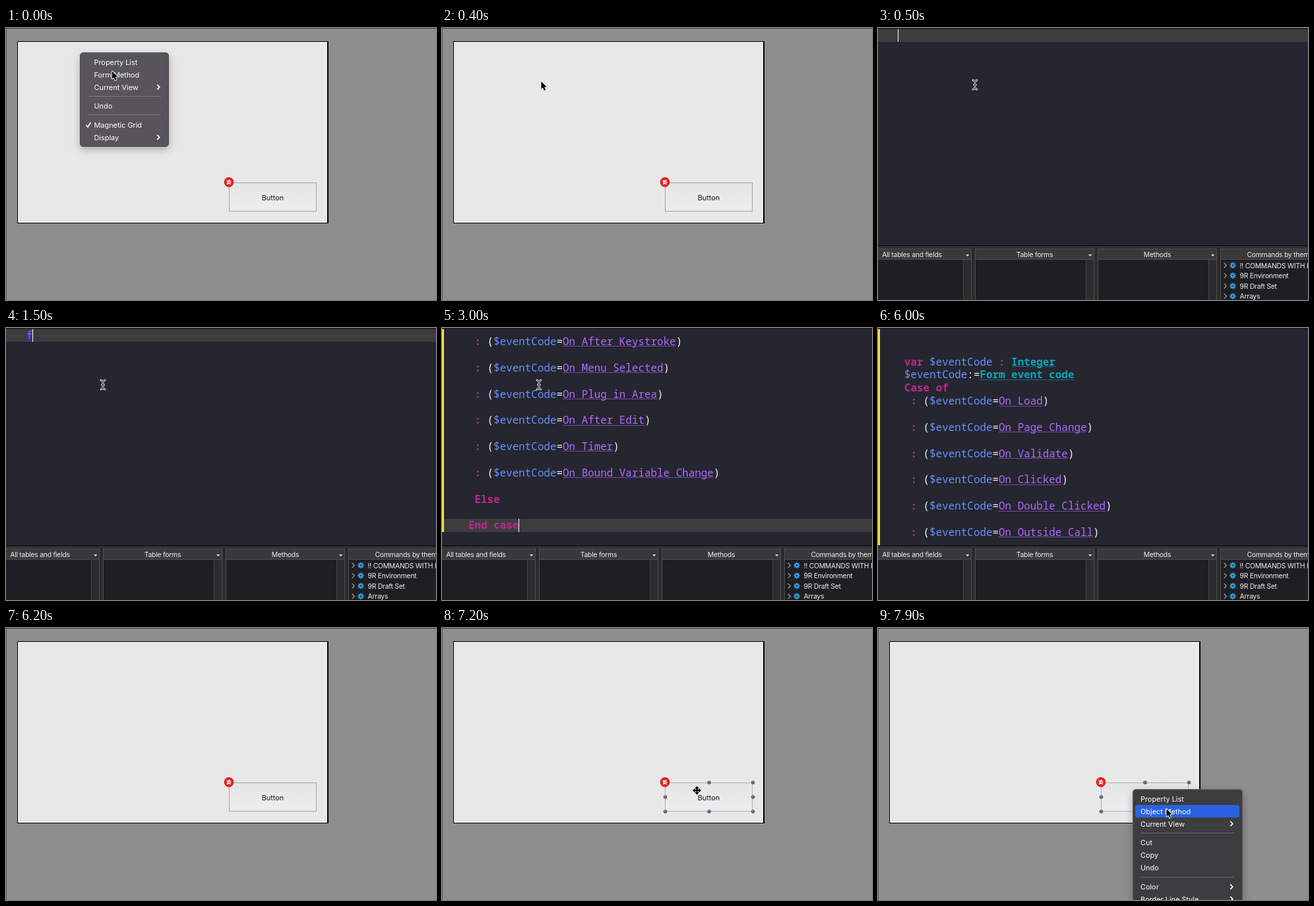
An HTML page with a canvas that plays this animation: 652x412 px, repeating every 8 s.

```html
<!DOCTYPE html>
<html lang="en">
<head>
<meta charset="utf-8">
<title>Event code macro</title>
<style>
html, body { margin: 0; width: 100%; height: 100%; overflow: hidden; background: #8e8e8e; }
canvas { display: block; }
</style>
</head>
<body>
<canvas id="stage" width="652" height="412"></canvas>
<script>
const LOOP = 8000, STEP = 100;
const UI = "Inter, 'Open Sans', sans-serif";
const MONO = "'Noto Sans Mono', 'DejaVu Sans Mono', monospace";
const ADV = 9.535, ROW = 19.88, ROW0 = 11.2, LEFT = 40;
const C = {
  key: '#c2268f', vari: '#6690ff', cons: '#b069ff', type: '#0aa5bd', plain: '#f0f0f2'
};
const g = document.getElementById('stage').getContext('2d');

const clamp = v => Math.max(0, Math.min(1, v));
const span = (t, a, b) => clamp((t - a) / (b - a));
const ease = p => p * p * (3 - 2 * p);
const mix = (a, b, p) => a + (b - a) * p;

function box(x, y, w, h, color) {
  g.fillStyle = color;
  g.fillRect(x, y, w, h);
}

function round(x, y, w, h, r, color) {
  g.fillStyle = color;
  g.beginPath();
  g.roundRect(x, y, w, h, r);
  g.fill();
}

function disc(x, y, r, color) {
  g.fillStyle = color;
  g.beginPath();
  g.arc(x, y, r, 0, Math.PI * 2);
  g.fill();
}

function poly(points, close) {
  g.beginPath();
  points.forEach(([x, y]) => g.lineTo(x, y));
  if (close) g.closePath();
}

function line(points, color, width) {
  poly(points);
  g.strokeStyle = color;
  g.lineWidth = width;
  g.stroke();
}

// y is the middle of the capital letters
function label(str, x, y, color = '#fff', align = 'left', size = 10.9, track = 0) {
  g.font = `${size}px ${UI}`;
  g.letterSpacing = `${track}px`;
  g.textAlign = align;
  g.fillStyle = color;
  g.fillText(str, x, y + 4);
  g.letterSpacing = '0px';
}

const panelLabel = (str, x, y, align) => label(str, x, y, '#eee', align, 10.4, -0.25);

function chevron(x, y, color, s = 3.6, width = 1.7) {
  line([[x - s / 2, y - s], [x + s / 2, y], [x - s / 2, y + s]], color, width);
}

// ---- pointers ----
function arrow(x, y) {
  g.save();
  g.translate(x, y);
  poly([[0, 0], [0, 11.6], [2.6, 9.2], [4.5, 13.8], [6.6, 12.9], [4.7, 8.5], [8.2, 8.2]], true);
  g.lineJoin = 'round';
  g.strokeStyle = '#f4f4f4';
  g.lineWidth = 1.8;
  g.stroke();
  g.fillStyle = '#000';
  g.fill();
  g.restore();
}

function beam(x, y) {
  g.save();
  g.translate(x, y);
  for (const [color, w] of [['#f0f0f0', 2.7], ['#15151a', 1]]) {
    g.lineCap = 'round';
    for (const s of [-1, 1]) line([[-3, 7 * s], [0, 5.6 * s], [3, 7 * s]], color, w);
    line([[0, -5.6], [0, 5.6]], color, w);
    line([[-1.5, 0], [1.5, 0]], color, w);
  }
  g.restore();
}

function moveCross(x, y) {
  g.save();
  g.translate(x, y);
  for (const [color, w] of [['#f4f4f4', 2], ['#000', 0.3]]) {
    for (let i = 0; i < 4; i++) {
      g.rotate(Math.PI / 2);
      poly([[0, -1], [3, -1], [3, -3], [6.4, 0], [3, 3], [3, 1], [0, 1]], true);
      g.strokeStyle = color;
      g.lineWidth = w;
      g.stroke();
      if (color === '#000') { g.fillStyle = color; g.fill(); }
    }
  }
  g.restore();
}

// ---- form editor ----
function badge(x, y) {
  disc(x, y, 7.4, '#e3221f');
  poly([[-4, -3], [-1, -2.5], [0.5, -3.5], [3, -3], [1.6, -0.8], [4.4, 0],
        [1.8, 1], [3, 3.4], [0.2, 2.8], [-3.6, 3.6], [-2, 0]].map(([a, b]) => [x + a, y + b]), true);
  g.fillStyle = '#fff';
  g.fill();
  box(x - 0.4, y - 1, 1.6, 2, '#e3221f');
}

function form(selected) {
  box(0, 0, 652, 412, '#8e8e8e');
  box(0, 0, 1, 412, '#555');
  box(0, 0, 652, 1, '#3e3e3e');
  box(17, 20, 472, 276, '#000');
  box(18, 21, 469, 274, '#e8e8e8');

  const fill = g.createLinearGradient(0, 235, 0, 278);
  fill.addColorStop(0, '#e5e5e5');
  fill.addColorStop(1, '#ededef');
  box(338, 234, 133, 44, fill);
  g.strokeStyle = selected ? '#8c8f94' : '#a2a2a2';
  g.lineWidth = 1;
  if (selected) g.setLineDash([1.5, 0.8]);
  g.strokeRect(338.5, 234.5, 132, 43);
  g.setLineDash([]);
  label('Button', 404.5, 256.5, '#1a1a1a', 'center');

  if (selected) {
    for (const x of [338.5, 405, 471.5]) {
      for (const y of [234, 256, 278]) {
        if (x === 405 && y === 256) continue;
        disc(x, y, 2.8, '#566070');
        disc(x - 0.6, y - 0.7, 1, '#8a94a2');
      }
    }
  }
  badge(338, 233.5);
}

function menuPanel(x, y, w, h, color, rim) {
  g.save();
  g.shadowColor = 'rgba(0,0,0,.28)';
  g.shadowBlur = 12;
  g.shadowOffsetY = 4;
  round(x, y, w, h, 5.5, color);
  g.restore();
  g.strokeStyle = rim;
  g.lineWidth = 1;
  g.beginPath();
  g.roundRect(x + 0.5, y + 0.5, w - 1, h - 1, 5);
  g.stroke();
}

// an item without text is a separator
function menuItems(items, x, right) {
  for (const [str, y, sub] of items) {
    label(str, x, y);
    if (sub) chevron(right - 4, y, '#fff');
  }
}

function formMenu(alpha) {
  g.save();
  g.globalAlpha = alpha;
  menuPanel(112, 37, 135, 143, '#57545b', '#4b494f');
  for (const y of [103, 131]) box(125, y, 110, 1, '#7c7980');
  menuItems([['Property List', 51.5], ['Form Method', 70.5], ['Current View', 89.5, 1], ['Undo', 118],
    ['Magnetic Grid', 146.5], ['Display', 165.5, 1]], 133.5, 235);
  line([[121.5, 147], [124, 150], [128.5, 143]], '#fff', 1.7);
  g.restore();
}

function objectMenu(tipY) {
  menuPanel(386, 244, 167, 200, '#3d3d3f', '#616163');
  const row = Math.floor((tipY - 249) / 19);
  if (row >= 0) round(390, 249 + row * 19, 158, 19, 3.5, '#2a62e2');
  for (const y of [310, 377]) box(398, y, 142, 1, '#68686a');
  menuItems([['Property List', 258.5], ['Object Method', 277.5], ['Current View', 296.5, 1],
    ['Cut', 325], ['Copy', 344], ['Undo', 363], ['Color', 392, 1],
    ['Border Line Style', 410.5, 1]], 398, 540);
}

// ---- code editor ----
const events = ['Load', 'Page Change', 'Validate', 'Clicked', 'Double Clicked', 'Outside Call',
  'Close Box', 'Activate', 'Deactivate', 'Resize', 'Unload',
  'After Keystroke', 'Menu Selected', 'Plug in Area', 'After Edit', 'Timer', 'Bound Variable Change'];

// each line: [column, [text, color, bold, underline], ...]
const code = [];
code[2] = [0, ['var ', C.key, 1], ['$eventCode ', C.vari], [': ', C.key, 1], ['Integer', C.type, 1, 1]];
code[3] = [0, ['$eventCode', C.vari], [':=', C.plain], ['Form event code', C.type, 1, 1]];
code[4] = [0, ['Case of', C.key, 1]];
events.forEach((name, i) => {
  code[5 + 2 * i] = [1, [': ', C.key, 1], ['(', C.plain], ['$eventCode', C.vari], ['=', C.plain],
    ['On ' + name, C.cons, 0, 1], [')', C.plain]];
});
const last = 7 + 2 * events.length;
code[last - 2] = [1, ['Else', C.key, 1]];
code[last] = [0, ['End case', C.key, 1]];
const maxScroll = ROW0 + ROW * last - 298.7;

function mono(str, x, y, color, bold) {
  g.font = `${bold ? 700 : 500} 15.9px ${MONO}`;
  g.textAlign = 'left';
  g.fillStyle = color;
  g.fillText(str, x, y + 5.6);
}

function caretRow(y, caretX) {
  const top = Math.round(y - 10);
  box(0, top, 652, 20, '#3d3d3e');
  box(Math.round(caretX), top, 1, 20, '#fff');
}

function underline(x, y, w, color) {
  g.globalAlpha = 0.55;
  box(x, Math.round(y + 7), w, 1, color);
  g.globalAlpha = 1;
}

function listing(scroll) {
  const endY = ROW0 + ROW * last - scroll;
  caretRow(endY, LEFT + 8 * ADV);
  box(0, 1, 3, Math.round(endY + 9), '#f4df48');
  code.forEach((parts, i) => {
    const y = ROW0 + ROW * i - scroll;
    if (y < -14 || y > 345) return;
    let x = LEFT + parts[0] * ADV;
    for (const [str, color, bold, under] of parts.slice(1)) {
      const w = str.length * ADV;
      if (under) underline(x, y, w, color);
      mono(str, x, y, color, bold);
      x += w;
    }
  });
}

function typed(str) {
  const x = LEFT - ADV, w = str.length * ADV;
  caretRow(ROW0, x + w);
  if (!str) return;
  box(x + 0.5, 3, w - 0.5, 17, '#36367a');
  mono(str, x + 0.3, ROW0, '#7470f2');
}

function gear(x, y) {
  for (let i = 0; i < 8; i++) {
    const a = i * Math.PI / 4;
    line([[x, y], [x + 4.8 * Math.cos(a), y + 4.8 * Math.sin(a)]], '#2f9bd6', 1.7);
  }
  disc(x, y, 3.5, '#2f9bd6');
  disc(x, y, 1.2, '#1d2b38');
}

function panels() {
  box(0, 329, 652, 83, '#2b2b2e');
  box(0, 329, 652, 2, '#141417');
  box(0, 331, 652, 1, '#47474a');
  ['All tables and fields', 'Table forms', 'Methods', 'Commands by theme'].forEach((name, i) => {
    const x = -39 + 186 * i;
    box(x, 334, 181, 17, '#39393c');
    g.strokeStyle = '#505053';
    g.lineWidth = 1;
    g.strokeRect(x + 0.5, 334.5, 180, 80);
    box(x + 1, 351, 179, 61, '#1f1e22');
    box(x, 350, 181, 1, '#505053');
    box(x + 168, 351, 12, 61, '#2c2c2f');
    box(x + 168, 351, 1, 61, '#444447');
    panelLabel(name, x + 90.5, 342.5, 'center');
    poly([[x + 172, 343], [x + 177.5, 343], [x + 174.7, 346]], true);
    g.fillStyle = '#ddd';
    g.fill();
  });
  ['!! COMMANDS WITH ISSUES', '9R Environment', '9R Draft Set', 'Arrays'].forEach((name, i) => {
    const y = 359.5 + 15.6 * i;
    chevron(526.5, y, '#a0a0a3', 3.8, 1.2);
    gear(538, y);
    panelLabel(name, 548.5, y, 'left');
  });
}

function editor(t) {
  box(0, 0, 652, 412, '#25262f');
  if (t < 2500) typed(t < 1500 ? '' : t < 2200 ? 'form'.slice(0, (t - 1400) / 100) : 'forme');
  else listing(maxScroll * (1 - ease(span(t, 4400, 5200))));
  box(0, 0, 652, 1.5, '#1a1a1e');
  panels();
  if (t < 4200) {
    const p = ease(span(t, 3300, 4100));
    beam(mix(147, 662, p), mix(86, 335, p));
  } else if (t >= 5400) {
    const p = t < 5500 ? 0.06 : t < 5600 ? 0.55 : 1;
    if (p < 1) beam(mix(655, 85, p), mix(222, -12, p));
  }
}

// ---- timeline ----
function draw(t) {
  if (t < 500) {
    form(false);
    const fade = 1 - span(t, 0, 300);
    if (fade > 0) formMenu(fade);
    const p = ease(span(t, 0, 400));
    arrow(mix(161, 150.5, p), mix(65.5, 81, p));
  } else if (t < 6200) {
    editor(t);
  } else {
    const p = ease(span(t, 6300, 6900));
    form(t >= 6900);
    if (t >= 7300) {
      const q = ease(span(t, 7300, 7900));
      const x = mix(386, 437.5, q), y = mix(246, 274, q);
      objectMenu(y);
      arrow(x, y);
    } else if (t >= 6900) {
      moveCross(t < 7200 ? 384 : 386.5, t < 7200 ? 244 : 246);
    } else if (t >= 6400) {
      arrow(mix(194, 384, p), mix(12, 242, p));
    }
  }
}

const start = performance.now();
function tick() {
  const t = (performance.now() - start) % LOOP;
  draw(Math.floor(t / STEP) * STEP);
  requestAnimationFrame(tick);
}
tick();
</script>
</body>
</html>
```
